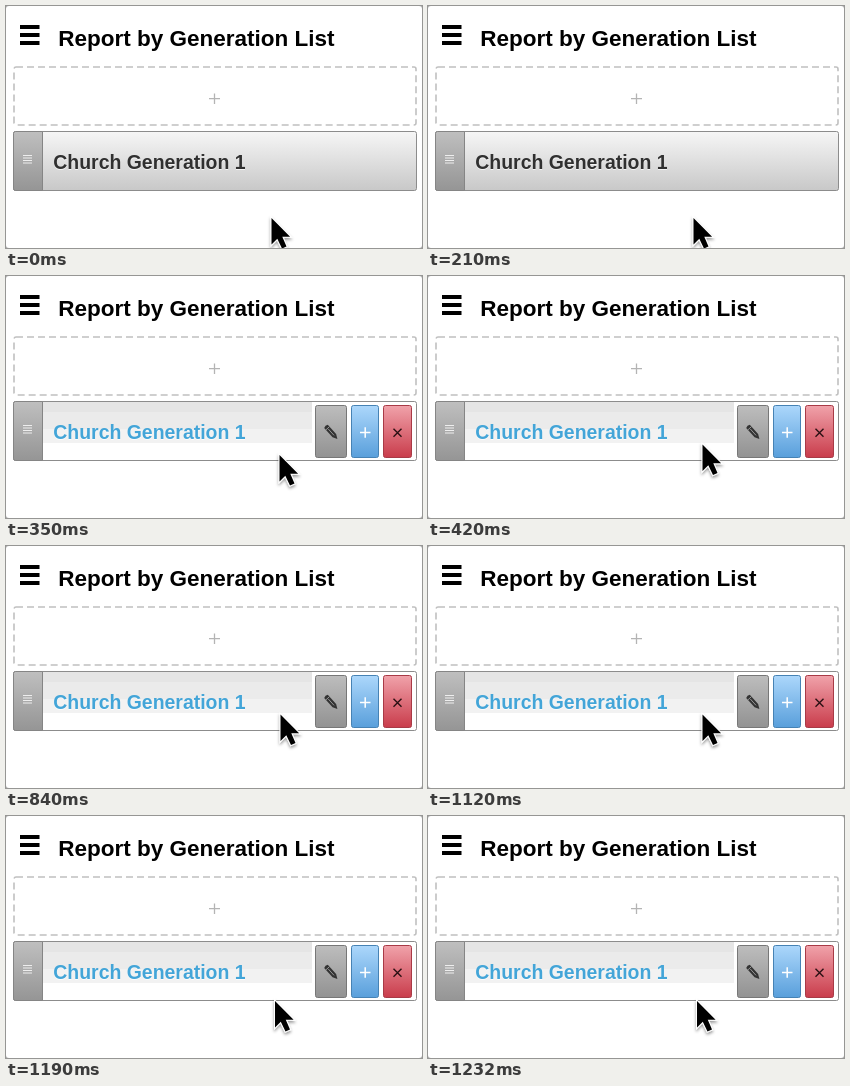
Write an HTML page that moves like this. It is 416 px wide and 242 px high and loops after 1.26 s.

```html
<!DOCTYPE html>
<html lang="en">
<head>
<meta charset="utf-8">
<title>Generation list</title>
<style>
  html, body { margin: 0; width: 100%; height: 100%; overflow: hidden; background: #aaa; }
  svg { display: block; width: 416px; height: 242px; }
  text { font-family: "Liberation Sans", Arial, sans-serif; font-weight: bold; }
  #label { filter: drop-shadow(0 1px 0 rgb(255 255 255 / .7)); }
</style>
</head>
<body>
<svg viewBox="0 0 416 242">
  <defs>
    <linearGradient id="silver" x2="0" y2="1"><stop stop-color="#f6f6f6"/><stop offset="1" stop-color="#c8c8c8"/></linearGradient>
    <linearGradient id="grip" x2="0" y2="1"><stop stop-color="#bfbfbf"/><stop offset="1" stop-color="#959595"/></linearGradient>
    <linearGradient id="gray" x2="0" y2="1"><stop stop-color="#bdbdbd"/><stop offset="1" stop-color="#929292"/></linearGradient>
    <linearGradient id="blue" x2="0" y2="1"><stop stop-color="#acd7fb"/><stop offset="1" stop-color="#599fdb"/></linearGradient>
    <linearGradient id="red" x2="0" y2="1"><stop stop-color="#f0a2aa"/><stop offset="1" stop-color="#c93c4b"/></linearGradient>
    <filter id="shadow" x="-50%" y="-50%" width="200%" height="200%">
      <feDropShadow dx="0" dy="2" stdDeviation="1.5" flood-opacity=".4"/>
    </filter>
  </defs>

  <rect width="416" height="242" rx="3" fill="#fff"/>
  <path d="M14 21H33.5M14 29H33.5M14 37H33.5" stroke="#000" stroke-width="4"/>
  <text x="52.3" y="40" font-size="22.5">Report by Generation List</text>

  <rect x="8" y="61" width="402" height="58" rx="2" fill="none" stroke="#c0c0c0" stroke-width="1.6" stroke-dasharray="7 4"/>
  <path d="M203 92.7H214M208.5 87.5V98" stroke="#b4b4b4" stroke-width="1.3"/>

  <rect id="row" x="7.5" y="125.5" width="403" height="59" rx="2" stroke="#8c8c8c"/>
  <g id="sheen">
    <path d="M37 126H306V136H37Z" fill="#e5e5e5"/>
    <path d="M37 136H306V153H37Z" fill="#ebebeb"/>
    <path d="M37 153H306V167H37Z" fill="#f2f2f2"/>
  </g>
  <path d="M36.5 184.5H9.5a2 2 0 0 1-2-2V127.5a2 2 0 0 1 2-2H36.5Z" fill="url(#grip)" stroke="#858585"/>
  <path d="M17 149.5H26M17 152H26M17 154.5H26M17 157H26" stroke="#eee" stroke-width="1.1"/>
  <text id="label" x="47.3" y="163" font-size="19.45">Church Generation 1</text>

  <g id="buttons">
    <rect x="309.5" y="129.5" width="31" height="52" rx="2" fill="url(#gray)" stroke="#777"/>
    <rect x="345.5" y="129.5" width="27" height="52" rx="2" fill="url(#blue)" stroke="#4682b4"/>
    <rect x="377.5" y="129.5" width="28" height="52" rx="2" fill="url(#red)" stroke="#a83a46"/>
    <g transform="translate(325 156) rotate(48)">
      <path d="M-7.5 -2.4H5L9.5 0L5 2.4H-7.5Q-8.8 0 -7.5 -2.4Z" fill="#333"/>
      <path d="M-5 -2.4V2.4M-4 0H4.5" stroke="#999" stroke-width=".9"/>
    </g>
    <path d="M354 156.5H364.5M359.2 151.3V161.8" stroke="#fff" stroke-width="1.5"/>
    <path d="M387.5 152.8L395.5 160.8M395.5 152.8L387.5 160.8" stroke="#2b1013" stroke-width="1.4"/>
  </g>

  <path id="cursor" d="M1 2.5V29L6.8 23.3L11.5 33L16 31L11.8 21.3H19.6Z" fill="#000" stroke="#fff" stroke-width="2" paint-order="stroke" filter="url(#shadow)"/>
</svg>
<script>
  const LOOP = 1260;
  const poses = [
    { from: 0, x: 264.5, y: 209.5 },
    { from: 350, x: 272.5, y: 176.5 },
    { from: 420, x: 273.5, y: 166 },
    { from: 1190, x: 268, y: 182.5 }
  ];
  const part = id => document.getElementById(id);
  const [row, sheen, label, buttons, cursor] =
    ["row", "sheen", "label", "buttons", "cursor"].map(part);

  function draw(now) {
    const time = now % LOOP;
    const pose = poses.findLast(p => time >= p.from);
    const hover = time >= 350;
    row.setAttribute("fill", hover ? "#fff" : "url(#silver)");
    label.setAttribute("fill", hover ? "#43a5d8" : "#303030");
    for (const el of [sheen, buttons]) el.setAttribute("visibility", hover ? "visible" : "hidden");
    cursor.setAttribute("transform", `translate(${pose.x} ${pose.y})`);
  }

  const start = performance.now();
  function tick() {
    draw(performance.now() - start);
    requestAnimationFrame(tick);
  }
  tick();
</script>
</body>
</html>
```
